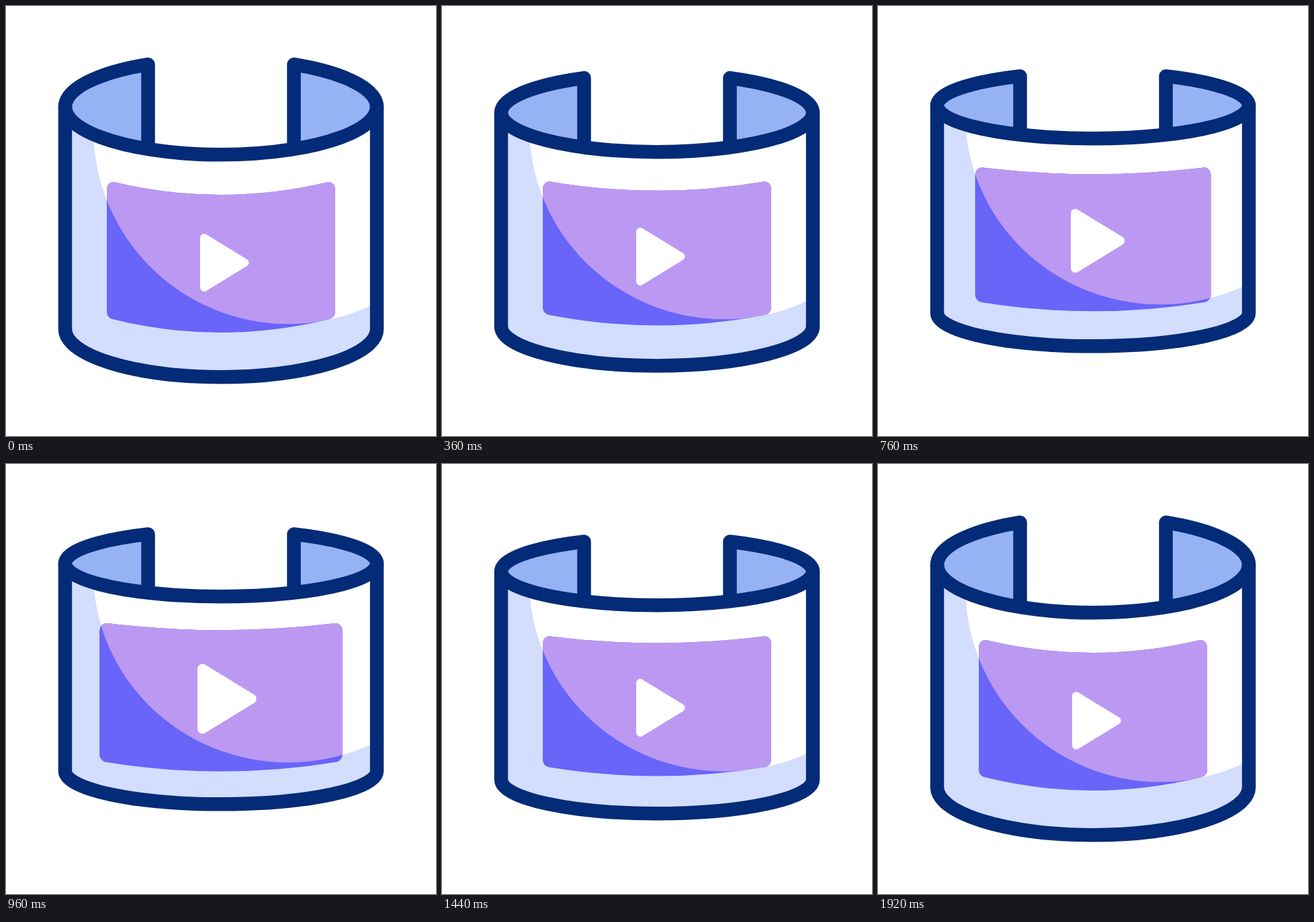
Recreate the animation shown at these times as an HTML page. Size 640 by 640 pixels, loop 2 s.

```html
<!DOCTYPE html>
<html lang="en">
<head>
<meta charset="utf-8">
<title>Curved screen</title>
<style>
  html, body { margin: 0; height: 100%; overflow: hidden; background: #fff; }
  svg { display: block; width: 100vw; height: 100vh; }
</style>
</head>
<body>
<svg viewBox="0 0 640 640">
  <defs>
    <clipPath id="lit"><ellipse id="glow" cx="420" rx="290"/></clipPath>
    <path id="wall"/>
    <path id="screen"/>
  </defs>
  <g id="lift">
    <use href="#wall" fill="#d3ddfd"/>
    <use href="#wall" fill="#fff" clip-path="url(#lit)"/>
    <use href="#screen" fill="#6865f8"/>
    <g clip-path="url(#lit)"><use href="#screen" fill="#bb99f2"/></g>
    <path id="play" d="M295 345V419L355.5 382Z" fill="#fff" stroke="#fff" stroke-width="12" stroke-linejoin="round"/>
    <g stroke="#032b77" stroke-width="20.5" stroke-linejoin="round">
      <path id="rim" fill="#95b2f4"/>
      <path id="sides" fill="none"/>
    </g>
  </g>
</svg>
<script>
const $ = id => document.getElementById(id);
const set = (id, name, value) => $(id).setAttribute(name, value);

// Cubic ease in and out, from 0 at time a to 1 at time b
function ease(t, a, b) {
  const p = Math.min(1, Math.max(0, (t - a) / (b - a)));
  return p < .5 ? 4 * p ** 3 : 1 - 4 * (1 - p) ** 3;
}
const pulse = (t, a, b, c, d) => ease(t, a, b) - ease(t, c, d);
const zoom = (x, y, k) => `translate(${x} ${y}) scale(${k}) translate(${-x} ${-y})`;

function draw(t) {
  const tilt = pulse(t, 0, 680, 1300, 1920);
  const rise = 17 * pulse(t, 390, 740, 1200, 1600);
  const screenZoom = 1 + .064 * pulse(t, 600, 920, 1060, 1380);
  const playZoom = 1 + .21 * pulse(t, 600, 920, 950, 1270);

  const top = 150 + 15 * tilt, bottom = 481 - 7 * tilt, ry = 71.3 - 22 * tilt;
  const arc = `A232 ${ry} 0 0`;
  const gap = ry * Math.sqrt(1 - (108.5 / 232) ** 2);
  const sides = `M88 ${top}V${bottom}${arc} 0 552 ${bottom}V${top}`;
  set('lift', 'transform', `translate(0 ${-rise})`);
  set('sides', 'd', sides);
  set('wall', 'd', `${sides}${arc} 1 88 ${top}Z`);
  set('rim', 'd', `M211.5 ${top + gap}V${top - gap}A232 ${ry} 0 1 0 428.5 ${top - gap}V${top + gap}`);

  const glowRy = 290 - 7 * tilt;
  set('glow', 'ry', glowRy);
  set('glow', 'cy', 473.3 - 12 * tilt - glowRy);

  // Corner heights and the sagging middles of both long edges
  const y1 = 262.5 - 1.5 * tilt, mid1 = 281 - 10.7 * tilt;
  const y2 = 466 - 11.2 * tilt, mid2 = 486 - 18 * tilt;
  set('screen', 'd', `M150 ${y1 + 11}C150 ${y1 + 3} 156 ${y1 - 1.8} 163 ${y1}
    Q320 ${2 * mid1 - y1} 477 ${y1}C484 ${y1 - 1.8} 490 ${y1 + 3} 490 ${y1 + 11}
    V${y2 - 11}C490 ${y2 - 6} 487 ${y2 - 1.5} 482 ${y2}
    Q320 ${2 * mid2 - y2} 158 ${y2}C153 ${y2 - 1.5} 150 ${y2 - 6} 150 ${y2 - 11}Z`);
  set('screen', 'transform', zoom(320, 365, screenZoom));
  set('play', 'transform', `translate(0 ${-15.5 * tilt}) ${zoom(308, 382, playZoom)}`);
}

const start = performance.now();
function tick() {
  const t = (performance.now() - start) % 2000;
  draw(Math.floor(t / 40) * 40);
  requestAnimationFrame(tick);
}
tick();
</script>
</body>
</html>
```
